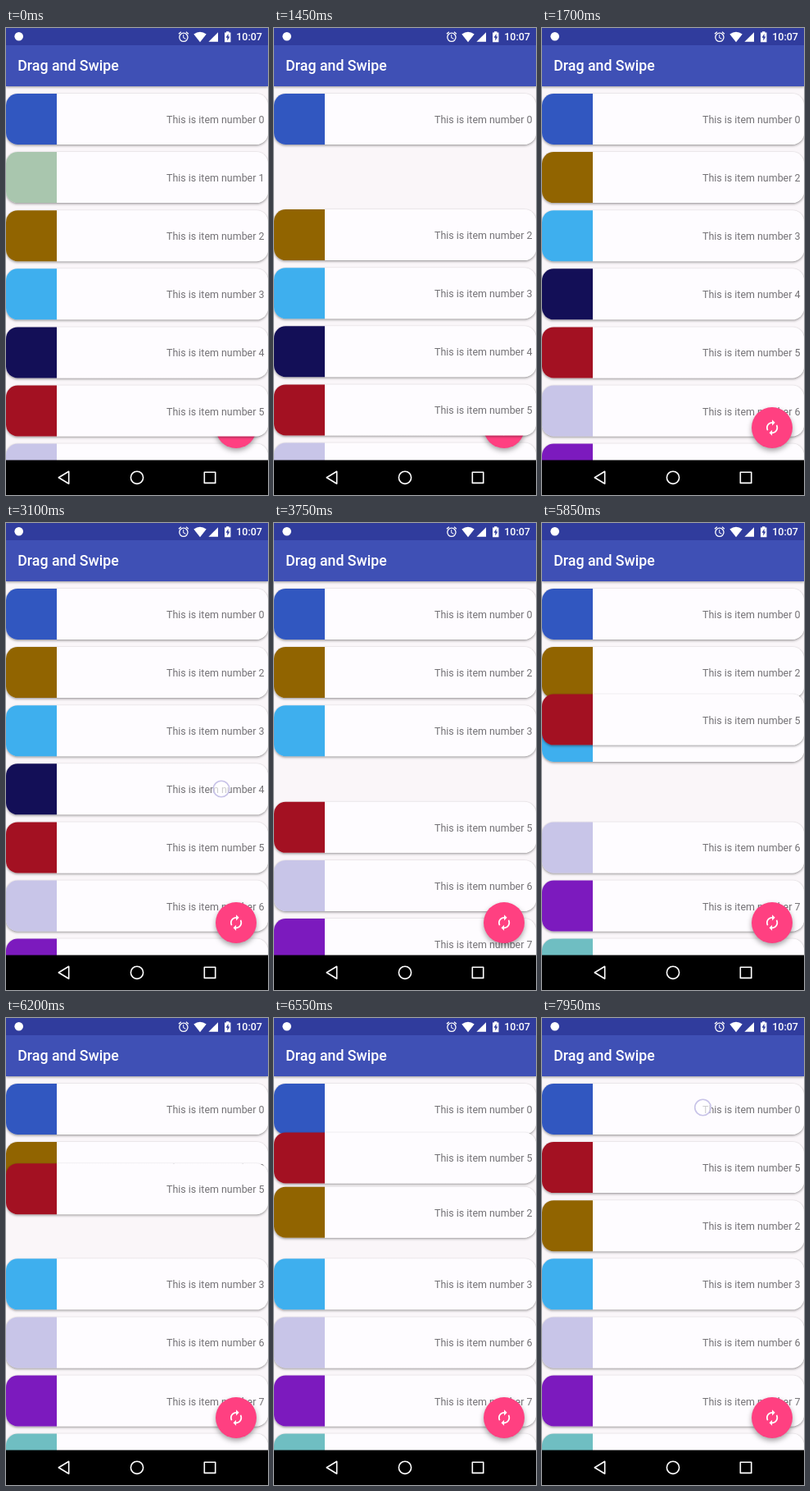
An HTML page for the animation above (8000 ms loop, 320x569 px).

```html
<!DOCTYPE html>
<html lang="en">
<head>
<meta charset="utf-8">
<title>Drag and Swipe</title>
<style>
  html, body { margin: 0; width: 100%; height: 100%; overflow: hidden; background: #faf6f9; }
  body { position: relative; font-family: Roboto, sans-serif; }
  #list { position: absolute; inset: 0; overflow: hidden; }
  .card {
    position: absolute; left: 0; top: 0; width: 320px; height: 62.2px; box-sizing: border-box;
    padding-right: 4.5px; border-radius: 14.2px; text-align: right;
    font-size: 12.44px; line-height: 63px; color: #747276;
    box-shadow: 0 1.5px 3px rgba(0, 0, 0, .34), 0 0 1.5px rgba(0, 0, 0, .16);
  }
  #bar {
    position: absolute; left: 0; top: 0; width: 320px; height: 71px; box-sizing: border-box;
    padding: 21px 0 0 14.2px; background: linear-gradient(#303c9d 21.3px, #3f50b5 21.3px);
    color: #fff; font-size: 17.78px; font-weight: 500; line-height: 51px;
    box-shadow: 0 1px 3px rgba(0, 0, 0, .4);
  }
  #fab {
    position: absolute; left: 256px; top: 462px; width: 50px; height: 50px;
    border-radius: 50%; background: #ff4081; box-shadow: 0 3px 6px rgba(0, 0, 0, .36);
  }
  #overlay { position: absolute; left: 0; top: 0; }
</style>
</head>
<body>
<div id="list"></div>
<div id="bar">Drag and Swipe</div>
<div id="fab"></div>
<svg id="overlay" width="320" height="569" viewBox="0 0 320 569" fill="#fff">
  <!-- status bar -->
  <circle cx="15.7" cy="10.3" r="5.3"/>
  <path transform="translate(209.2 3) scale(.64)" d="M22 5.72l-4.6-3.86-1.29 1.53 4.6 3.86zM7.88 3.39L6.6 1.86 2 5.71l1.29 1.53zM12.5 8H11v6l4.75 2.85.75-1.23-4-2.37zM12 4a9 9 0 1 0 0 18a9 9 0 0 0 0-18zm0 16a7 7 0 1 1 0-14a7 7 0 0 1 0 14z"/>
  <path d="M229.3 7.6Q237 1.8 244.7 7.6L237 17.2Z"/>
  <path d="M247.4 16.8H259V5.2Z"/>
  <path d="M267 5.6h2v-1.4h3.4v1.4h2v11.6H267Z"/>
  <path fill="#303c9d" d="M271.5 7l-3 4.8h1.8v3.6l3-5h-1.8Z"/>
  <text x="281.3" y="15" font-size="12.44" font-weight="500">10:07</text>
  <!-- button icon -->
  <path transform="translate(270.4 476.4) scale(.889)" d="M12 6v3l4-4-4-4v3c-4.42 0-8 3.58-8 8 0 1.57.46 3.03 1.24 4.26L6.7 14.8c-.45-.83-.7-1.79-.7-2.8 0-3.31 2.69-6 6-6zm6.76 1.74L17.3 9.2c.44.84.7 1.79.7 2.8 0 3.31-2.69 6-6 6v-3l-4 4 4 4v-3c4.42 0 8-3.58 8-8 0-1.57-.46-3.03-1.24-4.26z"/>
  <!-- navigation bar -->
  <path fill="#000" d="M0 526.4H320V569H0Z"/>
  <g fill="none" stroke="#fff" stroke-width="1.6" stroke-linejoin="round">
    <path d="M76.7 540.3V555.3L64.3 547.8Z"/>
    <circle cx="160" cy="547.8" r="7.6"/>
    <path d="M242.3 541.3H255.7V554.4H242.3Z"/>
  </g>
  <circle id="touch" r="9.8" fill="#fff" fill-opacity=".65" stroke="#c8c3e8" stroke-width="1.6"/>
</svg>
<script>
const LOOP = 8000, PITCH = 71.1, TOP = 80;
const COLORS = ['#3157c0', '#a9c6ae', '#916400', '#3eafee', '#130f57', '#a31122', '#c8c5e8', '#7c1abe', '#6fbec2'];
const SWIPES = [
  { item: 1, start: 850, x: 65, y: 183, dir: 1 },
  { item: 4, start: 3070, x: 263, y: 324, dir: -1 }
];
const GRAB = 4570, RELEASE = 6790, LAST_TOUCH = 7930;
const DRAG_X = [[5450, 191], [5850, 189], [6250, 187], [6550, 184]];
const DRAG_Y = [[5430, 328], [5550, 306], [5850, 240], [6000, 220], [6250, 209], [6300, 207], [6400, 182], [6500, 174.2], [6790, 173.5]];

const list = document.getElementById('list');
const touch = document.getElementById('touch');
const cards = COLORS.map((color, i) => {
  const card = document.createElement('div');
  card.className = 'card';
  card.textContent = 'This is item number ' + i;
  card.style.background = `linear-gradient(90deg, ${color} 62.2px, #fefcff 62.2px)`;
  card.style.zIndex = i === 5 ? 1 : 0;
  return list.appendChild(card);
});

const clamp = v => Math.min(1, Math.max(0, v));
const ease = (t, start, length = 250) => (1 - Math.cos(Math.PI * clamp((t - start) / length))) / 2;
const mix = (a, b, k) => a + (b - a) * k;

function along(points, t) {
  let value = points[0][1];
  for (let i = 1; i < points.length; i++) {
    const [t0, v0] = points[i - 1], [t1, v1] = points[i];
    if (t >= t0) value = mix(v0, v1, clamp((t - t0) / (t1 - t0)));
  }
  return value;
}

// The finger pulls first; the card then flies out on its own.
const pull = (s, t) => s.dir * 160 * clamp((t - s.start - 60) / 200) ** 1.4;
const slide = (s, t) => mix(pull(s, t), s.dir * 335, ease(t, s.start + 260, 200));

function cardPlace(i, t) {
  let slot = i, x = 0;
  for (const s of SWIPES) {
    if (i === s.item) x = slide(s, t);
    if (i > s.item) slot -= ease(t, s.start + 580);
  }
  if (i === 3) slot += ease(t, 5800);
  if (i === 2) slot += ease(t, 6380);
  let y = TOP + slot * PITCH;
  if (i === 5 && t > GRAB) {
    y += along(DRAG_Y, t - 15) - 328;
    y = mix(y, TOP + PITCH, ease(t, RELEASE));
  }
  return [x, y];
}

function touchPlace(t) {
  const s = SWIPES.find(s => t >= s.start && t < s.start + 260);
  if (s) return [s.x + pull(s, t), s.y];
  if (t >= GRAB && t < RELEASE) return [along(DRAG_X, t), along(DRAG_Y, t)];
  if (t >= LAST_TOUCH) return [196.5, 109];
  return null;
}

function draw(now) {
  const t = now % LOOP;
  cards.forEach((card, i) => {
    const [x, y] = cardPlace(i, t);
    card.style.transform = `translate(${x}px, ${y}px)`;
  });
  const place = touchPlace(t);
  touch.style.display = place ? '' : 'none';
  if (place) touch.setAttribute('transform', `translate(${place})`);
}

let begin;
function tick(now) {
  begin ??= now;
  draw(now - begin);
  requestAnimationFrame(tick);
}
draw(0);
requestAnimationFrame(tick);
</script>
</body>
</html>
```
